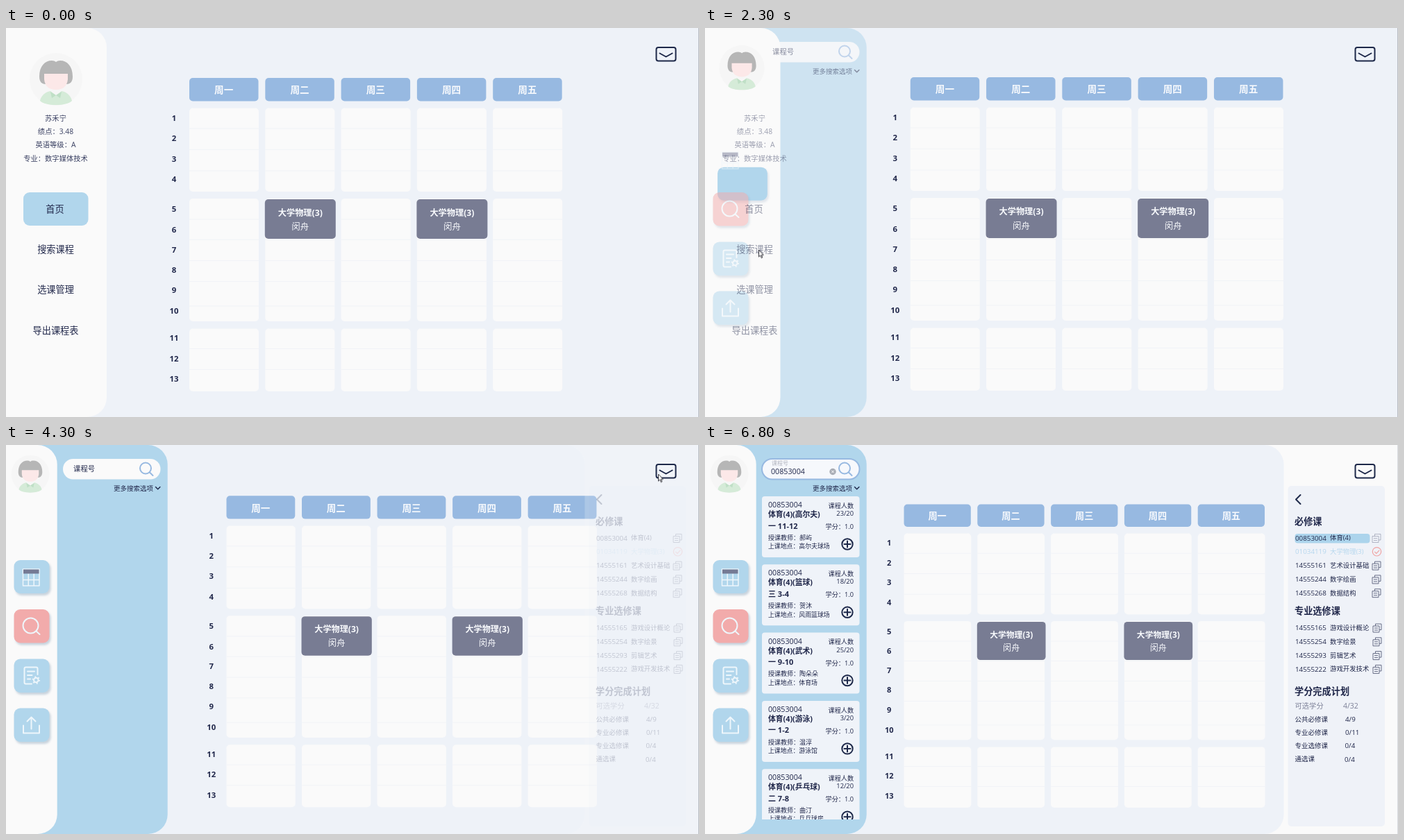
Write an HTML page that moves like this. It is 998 by 561 pixels and loops after 6.9 s.

```html
<!DOCTYPE html>
<html lang="zh-CN">
<head>
<meta charset="utf-8">
<title>选课系统</title>
<style>
@property --fold-t { syntax: "<number>"; inherits: true; initial-value: 0; }
@property --dock-t { syntax: "<number>"; inherits: true; initial-value: 0; }
@property --find-t { syntax: "<number>"; inherits: true; initial-value: 0; }
@property --hand { syntax: "<number>"; inherits: true; initial-value: 0; }

html, body { margin: 0; width: 100%; height: 100%; overflow: hidden; background: #eef2f8; }
body { animation: 6900ms linear -20ms infinite; animation-name: fold, dock, find; }
svg {
  display: block; width: 998px; height: 561px;
  font-family: "Open Sans", "Noto Sans CJK SC", "Noto Sans CJK", sans-serif;
  /* cubic ease-in */
  --fold: calc(var(--fold-t) * var(--fold-t) * var(--fold-t));
  --dock: calc(var(--dock-t) * var(--dock-t) * var(--dock-t));
  --find: calc(var(--find-t) * var(--find-t) * var(--find-t));
}
text { fill: #20274a; white-space: pre; }
.b { font-weight: 700; }
.m { text-anchor: middle; }
.e { text-anchor: end; }
.w { fill: #f8fafd; }
.line { fill: none; stroke: #1d2849; stroke-width: 2; stroke-linecap: round; stroke-linejoin: round; }
.icon { fill: none; stroke: #eef6fb; stroke-width: 2; stroke-linecap: round; stroke-linejoin: round; }
.copy { fill: none; stroke: #666c85; }
.tile { filter: drop-shadow(2px 3px 1.5px rgb(110 140 170 / .35)); }

#table {
  transform:
    translate(calc(264px + 62px * var(--fold) - 39.5px * var(--dock)),
              calc(72px - 2px * var(--fold) + 15.5px * var(--dock)))
    scale(calc(1 - .032 * var(--dock)));
}
#side { width: calc(185px - 71.3px * var(--fold)); }
#avatar {
  transform:
    translate(calc(72px - 37px * var(--fold)), calc(74px - 32px * var(--fold)))
    scale(calc(1 - .28 * var(--fold)));
}
#home {
  x: calc(25px - 13.5px * var(--fold));
  y: calc(237px - 71px * var(--fold));
  width: calc(93.5px - 42.5px * var(--fold));
  filter: drop-shadow(2px 3px 1.5px rgb(110 140 170 / calc(.35 * var(--fold))));
}
.wide { opacity: calc(1 - var(--fold)); }
.slim { opacity: var(--fold); }
.docked { opacity: var(--dock); }
.found { opacity: var(--find); }
.empty { opacity: calc(1 - var(--find)); }
.picked { opacity: calc(1 - .55 * var(--find)); }

#hover, #edge, #cursor { animation: 6900ms step-end -20ms infinite; }
#hover { opacity: 0; animation-name: hover; }
#edge { fill: #b9bdc4; animation-name: edge; }
#cursor { animation-name: cursor; }
#arrow { opacity: calc(1 - var(--hand)); }
#hand { opacity: var(--hand); }
#cursor path { fill: #fff; stroke: #1c1c24; stroke-width: .9; stroke-linejoin: round; }

@keyframes fold {
  0%, 27.536% { --fold-t: 0; animation-timing-function: steps(5); }
  34.783%, 100% { --fold-t: 1; }
}
@keyframes dock {
  0%, 57.971% { --dock-t: 0; animation-timing-function: steps(5); }
  65.217%, 100% { --dock-t: 1; }
}
@keyframes find {
  0%, 79.71% { --find-t: 0; animation-timing-function: steps(3); }
  84.058%, 100% { --find-t: 1; }
}
@keyframes hover {
  0% { opacity: 0; }
  14.493% { opacity: 1; }
  27.536%, 100% { opacity: 0; }
}
@keyframes edge {
  98.551%, 100% { fill: #d9dce0; }
}
@keyframes cursor {
  0% { opacity: 0; --hand: 0; transform: translate(21px, 14px); }
  4.348% { opacity: 1; --hand: 0; transform: translate(21px, 14px); }
  5.797% { opacity: 0; --hand: 0; transform: translate(21px, 14px); }
  8.696% { opacity: 1; --hand: 0; transform: translate(8px, 430px); }
  10.145% { opacity: 1; --hand: 0; transform: translate(20px, 416px); }
  11.594% { opacity: 1; --hand: 0; transform: translate(40px, 394px); }
  13.043% { opacity: 1; --hand: 0; transform: translate(59px, 366px); }
  14.493% { opacity: 1; --hand: 0; transform: translate(76px, 341px); }
  15.942% { opacity: 1; --hand: 0; transform: translate(87px, 330px); }
  17.391% { opacity: 1; --hand: 0; transform: translate(90px, 326px); }
  20.29% { opacity: 1; --hand: 1; transform: translate(90px, 326px); }
  23.188% { opacity: 1; --hand: 1; transform: translate(81px, 322px); }
  24.638% { opacity: 1; --hand: 1; transform: translate(73px, 319px); }
  27.536% { opacity: 1; --hand: 0; transform: translate(77px, 319.5px); }
  40.58% { opacity: 1; --hand: 0; transform: translate(98px, 319px); }
  42.029% { opacity: 1; --hand: 0; transform: translate(168px, 313px); }
  43.478% { opacity: 1; --hand: 0; transform: translate(272px, 297px); }
  44.928% { opacity: 1; --hand: 0; transform: translate(430px, 260px); }
  46.377% { opacity: 1; --hand: 0; transform: translate(600px, 207px); }
  47.826% { opacity: 1; --hand: 0; transform: translate(755px, 148px); }
  49.275% { opacity: 1; --hand: 0; transform: translate(854px, 101px); }
  50.725% { opacity: 1; --hand: 0; transform: translate(886px, 80px); }
  52.174% { opacity: 1; --hand: 0; transform: translate(907px, 66px); }
  53.623% { opacity: 1; --hand: 0; transform: translate(923px, 54px); }
  55.072% { opacity: 1; --hand: 0; transform: translate(934px, 46px); }
  56.522% { opacity: 1; --hand: 0; transform: translate(939px, 41.5px); }
  71.014% { opacity: 1; --hand: 0; transform: translate(944px, 56px); }
  72.464% { opacity: 1; --hand: 0; transform: translate(953px, 82px); }
  73.913% { opacity: 1; --hand: 0; transform: translate(961px, 105px); }
  75.362% { opacity: 1; --hand: 1; transform: translate(966px, 121.5px); }
  76.812% { opacity: 1; --hand: 1; transform: translate(972px, 130.5px); }
  78.261% { opacity: 1; --hand: 1; transform: translate(968px, 129px); }
  91.304% { opacity: 1; --hand: 1; transform: translate(968px, 131px); }
  92.754%, 100% { opacity: 0; --hand: 0; transform: translate(968px, 131px); }
}
</style>
</head>
<body>
<svg viewBox="0 0 998 561" xmlns="http://www.w3.org/2000/svg">
  <defs>
    <clipPath id="list"><rect x="76" y="60" width="155" height="480"/></clipPath>
  </defs>
  <rect width="998" height="561" fill="#eef2f8"/>
  <g id="table"></g>

  <g class="slim">
    <rect x="-40" width="272.7" height="561" rx="28" fill="#b1d6ec"/>
    <rect x="82" y="20" width="140.5" height="29.5" rx="14.7" fill="#fafafa"/>
    <rect class="found" x="82" y="20" width="140.5" height="29.5" rx="14.7" fill="#f6f8fc" stroke="#97b9e1" stroke-width="2"/>
    <g fill="none" stroke="#97b9e1" stroke-width="2" stroke-linecap="round"><circle cx="201" cy="33.5" r="8"/><path d="M207 39.5l4.5 4.5"/></g>
    <path class="line" stroke-width="1.4" d="M215.5 60.5l3.2 3.2 3.2-3.2" style="stroke-width:1.4"/>
  </g>

  <rect id="side" x="-40" height="561" rx="28" fill="#fafafa"/>
  <g id="avatar">
    <circle r="38" fill="#f6f6f6"/>
    <path fill="#b6b6b6" d="M-15 7C-21 7-24 3-24-4C-24-19-16-27-6-27Q-2-27 0-25Q2-27 6-27C16-27 24-19 24-4C24 3 21 7 15 7Z"/>
    <path fill="#fce8e8" d="M-17-8H17V0C16 10 10 15 0 15S-16 10-17 0Z"/>
    <path fill="#d5ebd8" d="M-23 31C-21 22-14 18-8 17L0 23L8 17C14 18 21 22 23 31C15 39-15 39-23 31Z"/>
    <path fill="#bfdfc6" d="M-8 18L0 23L-6 27ZM8 18L0 23L6 27Z"/>
  </g>
  <g class="slim" id="search"></g>

  <rect id="hover" x="24" y="295" width="93.5" height="48" rx="9" fill="#d8eaf6"/>
  <rect id="home" height="48" rx="9" fill="#b1d6ec"/>
  <g class="slim">
    <g class="tile">
      <rect x="11.5" y="237" width="51" height="48.5" rx="9" fill="#f2abab"/>
      <rect x="11.5" y="308.5" width="51" height="48.5" rx="9" fill="#b1d6ec"/>
      <rect x="11.5" y="379.5" width="51" height="48.5" rx="9" fill="#b1d6ec"/>
    </g>
    <path class="icon" style="stroke-width:1.5" d="M24.5 179H48V203H24.5ZM32.3 186V203M40.2 186V203M24.5 194.5H48"/>
    <rect x="25" y="179.5" width="22.5" height="6" fill="#757a94"/>
    <g class="icon">
      <circle cx="35.5" cy="260.5" r="11"/><path d="M43.5 268.5l5 4.5"/>
      <path d="M37 344.5H28.5Q26.5 344.5 26.5 342.5V322.500Q26.5 320.500 28.500 320.500H43.500Q45.500 320.500 45.500 322.500V331M31 326.500H41M31 332H37.500M31 337.500H35"/>
      <circle cx="43.300" cy="339" r="3.300"/>
      <circle cx="43.300" cy="339" r="4.800" stroke-dasharray="1.800 3.227" stroke-linecap="butt"/>
      <path d="M25 404.500V415.500H48V404.500M36.500 409.500V393M30.500 398.500L36.500 392.500L42.500 398.500"/>
    </g>
  </g>
  <g class="wide" id="profile"></g>

  <g class="docked">
    <path fill="#fafafa" d="M805 0A28 28 0 0 1 833.5 28V533A28 28 0 0 1 805 561H998V0Z"/>
    <rect x="839.5" y="59" width="139.500" height="491" rx="5" fill="#eff2f8"/>
    <path class="line" d="M857.500 72L851 78.500L857.500 85"/>
    <rect class="found" x="849.500" y="128" width="108" height="13.500" rx="4" fill="#acd4ec"/>
    <g id="plan"></g>
  </g>
  <g class="line"><rect x="936.500" y="28" width="28" height="19.500" rx="3"/><path d="M941.500 36.500L950.500 41.500L959.500 36.500"/></g>

  <rect id="edge" x="997" width="1" height="561"/>
  <g id="cursor">
    <path id="arrow" d="M.5.5V10.500L2.800 8.400L4.300 12L5.800 11.300L4.300 7.900H7.300Z"/>
    <path id="hand" d="M3 7V1.500Q3.800 0 4.700 1.500V4.700L8.400 5.500Q9.700 6 9.500 7.500L8.800 11.600H4L.7 7.700Q.5 6 2 6.400Z"/>
  </g>
</svg>
<script>
const fill = (id, parts) => document.getElementById(id).innerHTML = parts.flat(3).join('');
// y is the vertical middle of the line
const text = (x, y, size, str, cls = '', style = '') =>
  `<text x="${x}" y="${y + size * .37}" font-size="${size}" class="${cls}" style="${style}">${str}</text>`;
const box = (x, y, w, h, color, r = 5) =>
  `<rect x="${x}" y="${y}" width="${w}" height="${h}" rx="${r}" fill="${color}"/>`;

// timetable
const blocks = [[43.5, 120.5], [174, 177], [361.5, 90.5]];
const rules = [73, 103.3, 134, 204, 233.3, 263.5, 293.5, 329, 390.5, 420.5];
const hours = [57.5, 87, 116.5, 146, 189, 218.5, 247.5, 276.5, 306, 336, 375, 404.5, 434];
const lesson = x => [
  box(x, 175, 102, 57, '#787c93'),
  text(x + 51, 194, 12.2, '大学物理(3)', 'b m w'),
  text(x + 51, 214, 12.5, '闵舟', 'm w'),
];
fill('table', [
  [...'一二三四五'].map((day, i) => {
    const x = i * 109.3;
    return [
      box(x, 0, 99.5, 33.5, '#97b9e1'),
      text(x + 49.7, 17.3, 13.6, '周' + day, 'b m w'),
      blocks.map(([y, h]) => box(x, y, 100, h, '#fafafa')),
      rules.map(y => box(x, y - .5, 100, 1, '#f1f3f7', 0)),
    ];
  }),
  hours.map((y, i) => text(-22, y, 11.4, i + 1, 'b m')),
  lesson(108.8), lesson(327.4),
]);

// profile and menu
fill('profile', [
  ['苏禾宁', '绩点：3.48', '英语等级：A', '专业：数字媒体技术']
    .map((s, i) => text(71.5, 130 + i * 19.3, 10.3, s, 'm', 'fill:#3a4062')),
  ['首页', '搜索课程', '选课管理', '导出课程表']
    .map((s, i) => text(i ? 71.5 : 70.5, 261 + i * 58.3, 13.2, s, 'm')),
]);

// search results
const courses = [
  ['高尔夫', '23/20', '一 11-12', '郝屿', '高尔夫球场'],
  ['篮球', '18/20', '三 3-4', '贺沐', '风雨篮球场'],
  ['武术', '25/20', '一 9-10', '陶朵朵', '体育场'],
  ['游泳', '3/20', '一 1-2', '温淳', '游泳馆'],
  ['乒乓球', '12/20', '二 7-8', '曲汀', '乒乓球房'],
];
const card = ([name, seats, slot, teacher, place], i) => {
  const y = 74 + i * 98.3;
  return [
    box(82, y, 140.5, 88, '#eff3f9', 4),
    text(91, y + 12, 10.7, '00853004'),
    text(214, y + 13.5, 9.1, '课程人数', 'e'),
    text(91, y + 26, 10.8, `体育(4)(${name})`, 'b'),
    text(214, y + 24.5, 9.3, seats, 'e'),
    text(91, y + 42.5, 11, slot, 'b'),
    text(214, y + 43.5, 9.2, '学分：1.0', 'e'),
    text(91, y + 59.3, 9, '授课教师：' + teacher),
    text(91, y + 72, 8.9, '上课地点：' + place),
    `<g class="line"><circle cx="205" cy="${y + 69}" r="7.7"/><path d="M200.500 ${y + 69}h9M205 ${y + 64.5}v9"/></g>`,
  ];
};
fill('search', [
  text(97, 34.5, 10.4, '课程号', 'empty'),
  text(155, 62, 9.5, '更多搜索选项'),
  '<g class="found">',
  text(96, 26, 8, '课程号', '', 'fill:#b0b3bd'),
  text(95, 38.5, 10.7, '00853004'),
  '<circle cx="184" cy="38.500" r="4.700" fill="#a9adb5"/><path d="M182.200 36.700l3.600 3.600m0-3.600l-3.600 3.600" stroke="#fff"/>',
  '<g clip-path="url(#list)">', courses.map(card), '</g></g>',
]);

// study plan
const copy = (x, y, cls) =>
  `<path class="copy ${cls}" d="M${x + 3.5} ${y - 3}v-3h8.500v8.500h-3M${x} ${y - 3}h9v9h-9zM${x + 2} ${y}h5m-5 3h5"/>`;
const tick = y =>
  `<g fill="none" stroke="#f0a3a3" stroke-width="1.200"><circle cx="967.500" cy="${y}" r="6.200"/><path d="M964.300 ${y}l2.500 2.500 4.300-4.500"/></g>`;
const row = (y, x, done) => ([code, name], i) => {
  const cy = y + i * 19.8, off = i === done, tint = off ? 'fill:#b5d7ee' : '';
  return [
    text(850, cy, 9.8, code, '', tint), text(900, cy, 9.4, name, '', tint),
    off ? tick(cy) : copy(x, cy + .5, done && !i ? 'picked' : ''),
  ];
};
const required = [['00853004', '体育(4)'], ['01034119', '大学物理(3)'], ['14555161', '艺术设计基础'],
  ['14555244', '数字绘画'], ['14555268', '数据结构']];
const elective = [['14555165', '游戏设计概论'], ['14555254', '数字绘景'], ['14555293', '剪辑艺术'],
  ['14555222', '游戏开发技术']];
const credits = [['可选学分', '4/32', 919], ['公共必修课', '4/9', 922], ['专业必修课', '0/11', 922],
  ['专业选修课', '0/4', 921.5], ['通选课', '0/4', 921]];
fill('plan', [
  text(849, 110, 13.2, '必修课', 'b'), required.map(row(134, 961, 1)),
  text(849, 239.5, 13.2, '专业选修课', 'b'), elective.map(row(263.5, 962)),
  text(849, 355, 13.2, '学分完成计划', 'b'),
  credits.map(([name, sum, x], i) => {
    const y = 375.7 + i * 19.3, tint = i ? '' : 'fill:#7d8198';
    return [text(849.5, y, i ? 9.5 : 10.3, name, '', tint), text(x, y, i ? 9.8 : 10.5, sum, '', tint)];
  }),
]);
</script>
</body>
</html>
```
